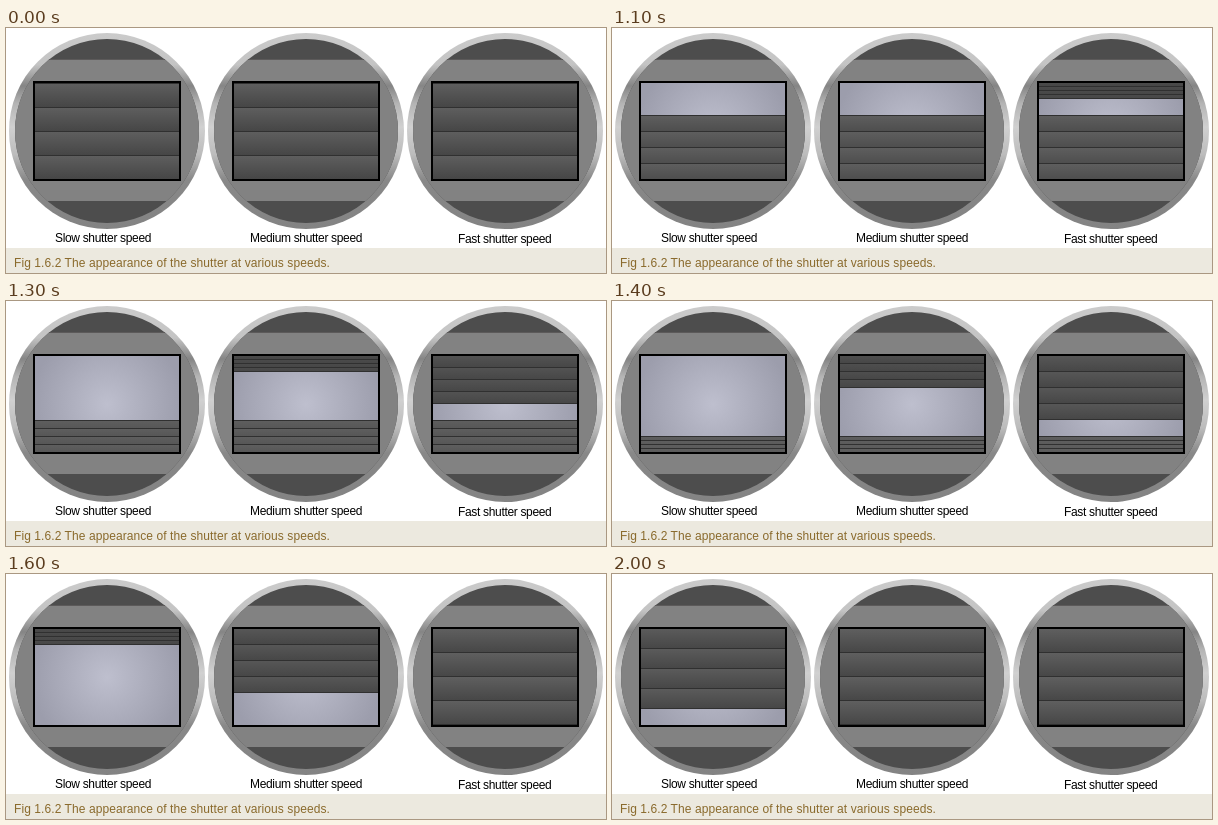
An HTML page that plays this animation: 600 px wide and 245 px high, repeating every 2100 ms.

```html
<!DOCTYPE html>
<html lang="en">
<head>
<meta charset="utf-8">
<title>Shutter speeds</title>
<style>
  html, body { margin: 0; width: 100%; height: 100%; overflow: hidden; background: #fff; }
  svg { display: block; }
  text { font: 12px Arial, "Liberation Sans", sans-serif; }
  .label { letter-spacing: -.33px; fill: #000; }
  .caption { letter-spacing: .08px; fill: #8a6a2c; }
</style>
</head>
<body>
<svg width="600" height="245" viewBox="0 0 600 245">
  <defs>
    <linearGradient id="ring" gradientUnits="userSpaceOnUse" x1="0" y1="5" x2="0" y2="201">
      <stop offset="0" stop-color="#cbcbcb"/>
      <stop offset=".16" stop-color="#c4c4c4"/>
      <stop offset=".27" stop-color="#858585"/>
      <stop offset=".36" stop-color="#b4b4b4"/>
      <stop offset=".48" stop-color="#d0d0d0"/>
      <stop offset=".62" stop-color="#bcbcbc"/>
      <stop offset=".75" stop-color="#888"/>
      <stop offset="1" stop-color="#838383"/>
    </linearGradient>
    <radialGradient id="sensor" gradientUnits="userSpaceOnUse" cx="101" cy="103" r="76">
      <stop offset="0" stop-color="#bebfce"/>
      <stop offset="1" stop-color="#9c9dac"/>
    </radialGradient>
    <linearGradient id="metal" x1="0" y1="0" x2="0" y2="1">
      <stop offset="0" stop-color="#5f5f5f"/>
      <stop offset="1" stop-color="#464646"/>
    </linearGradient>
    <clipPath id="disc"><circle cx="101" cy="103" r="92"/></clipPath>
    <clipPath id="window"><rect x="29" y="55" width="144" height="96"/></clipPath>
    <g id="body">
      <circle cx="101" cy="103" r="98" fill="url(#ring)"/>
      <g clip-path="url(#disc)">
        <rect x="9" y="11" width="184" height="184" fill="#4d4d4d"/>
        <rect x="9" y="31" width="184" height="1" fill="#5c5a5a"/>
        <rect x="9" y="32" width="184" height="141" fill="#828282"/>
      </g>
      <rect x="28" y="54" width="146" height="98" fill="url(#sensor)" stroke="#000" stroke-width="2"/>
    </g>
  </defs>
  <g id="panels"></g>
  <text class="label" x="49" y="214">Slow shutter speed</text>
  <text class="label" x="244" y="214">Medium shutter speed</text>
  <text class="label" x="452" y="215">Fast shutter speed</text>
  <rect y="220" width="600" height="25" fill="#ece9df"/>
  <text class="caption" x="8" y="239">Fig 1.6.2 The appearance of the shutter at various speeds.</text>
</svg>
<script>
const LOOP = 2100, HOLD = 1000, STEP = 100;
const TOP = 55, HEIGHT = 96, BLADES = 4, BLADE = HEIGHT / BLADES, TRAVEL = 16;
const DELAYS = [6, 3, 1]; // steps between the two curtains

function add(parent, tag, attrs) {
  const node = document.createElementNS("http://www.w3.org/2000/svg", tag);
  for (const key in attrs) node.setAttribute(key, attrs[key]);
  return parent.appendChild(node);
}

function addBlade(parent, lineY) {
  const blade = add(parent, "g", {});
  add(blade, "rect", { x: 29, width: 144, height: BLADE, fill: "url(#metal)" });
  add(blade, "rect", { x: 29, y: lineY, width: 144, height: 1, fill: "#303030" });
  return blade;
}

const panels = DELAYS.map((delay, i) => {
  const panel = add(document.getElementById("panels"), "g", { transform: `translate(${199 * i})` });
  add(panel, "use", { href: "#body" });
  const view = add(panel, "g", { "clip-path": "url(#window)" });
  const first = Array.from({ length: BLADES }, () => addBlade(view, 0));
  // Upper blades of the second curtain cover the lower ones.
  const second = Array.from({ length: BLADES }, () => addBlade(view, BLADE - 1)).reverse();
  return { delay, first, second };
});

const travelled = steps => Math.min(HEIGHT, Math.max(0, steps * TRAVEL));
const place = (blade, y) => blade.setAttribute("transform", `translate(0 ${y})`);

function draw(time) {
  const step = time < HOLD ? 0 : Math.floor((time - HOLD) / STEP) + 1;
  const open = travelled(step);
  for (const { delay, first, second } of panels) {
    const closed = travelled(step - delay);
    first.forEach((blade, i) => place(blade, TOP + open + (HEIGHT - open) * i / BLADES));
    second.forEach((blade, i) => place(blade, TOP + closed * (i + 1) / BLADES - BLADE));
  }
}

const start = performance.now();
function tick() {
  draw((performance.now() - start) % LOOP);
  requestAnimationFrame(tick);
}
tick();
</script>
</body>
</html>
```
